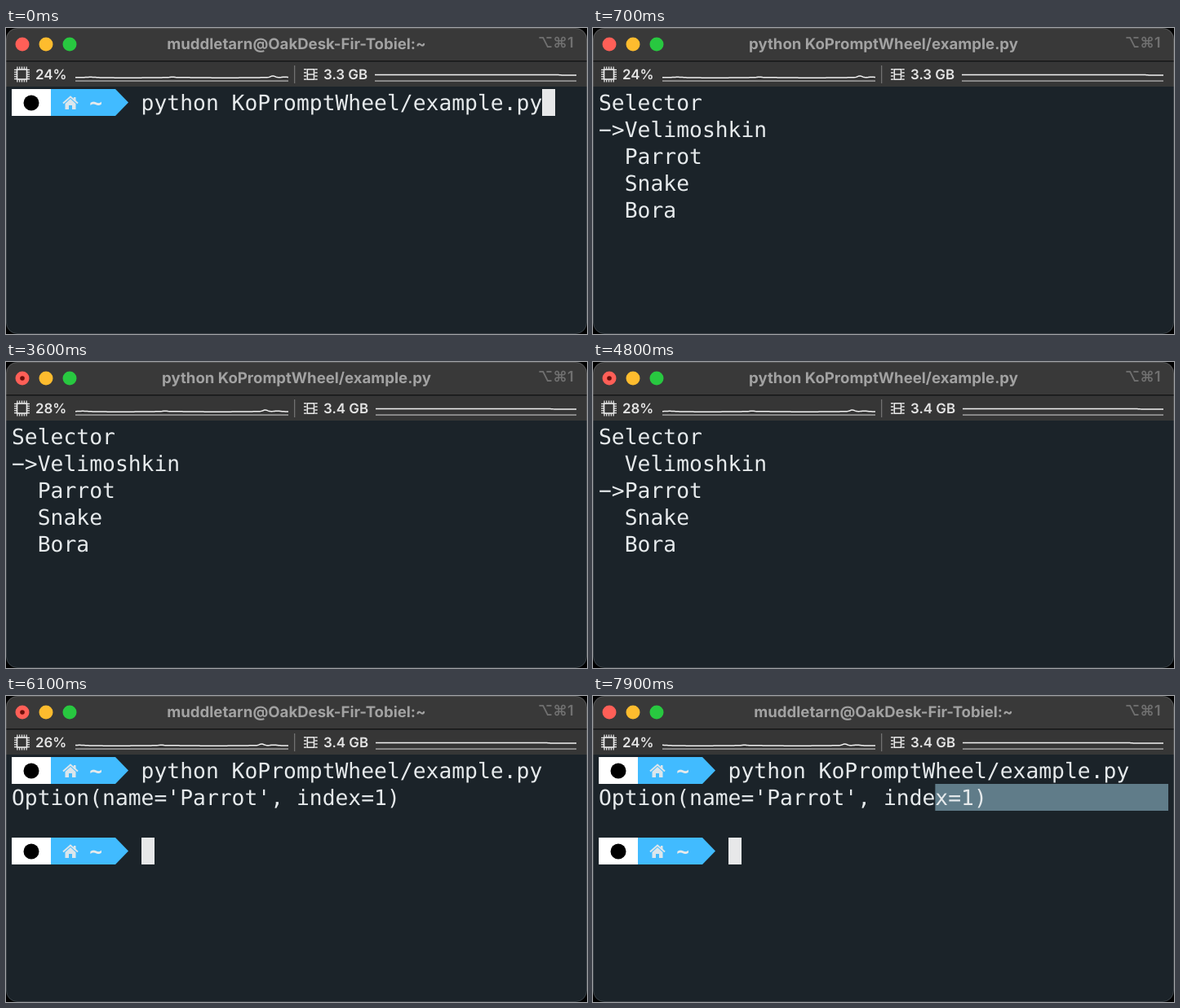
Recreate the animation shown at these times as an HTML page with a canvas. Size 712 by 376 pixels, loop 8 s.

```html
<!DOCTYPE html>
<html lang="en">
<head>
<meta charset="utf-8">
<title>Terminal menu</title>
<style>
  html, body { margin: 0; width: 100%; height: 100%; overflow: hidden; background: #000; }
  canvas { display: block; width: 712px; height: 376px; }
</style>
</head>
<body>
<canvas id="stage" width="712" height="376"></canvas>
<script>
const ctx = document.getElementById('stage').getContext('2d');
const W = 712, H = 376, LOOP = 8000;
const LEFT = 7, TOP = 75, COL = 15.86, ROW = 33;
const UI = 'Inter, "Open Sans", sans-serif';
const MONO = '"DejaVu Sans Mono", monospace';
const INK = '#e6eaec';

const COMMAND = 'python KoPromptWheel/example.py';
const SHELL = 'muddletarn@OakDesk-Fir-Tobiel:~';
const OPTIONS = ['Velimoshkin', 'Parrot', 'Snake', 'Bora'];

// Times in ms
const ENTER = 200, MENU = 400, CHOSEN = 5000, PROMPT = 5200;
const MOVES = [1300, 1900, 2500, 3200, 3900];
const UPDATES = [1100, 3000, 5100, 6800];
const CPU = ['24%', '24%', '28%', '26%', '24%'];
const SELECT_FROM = 7300, SELECT_TO = 7900;

const passed = (times, t) => times.filter(x => t >= x).length;
const bump = (x, at, w) => Math.exp(-(((x - at) / w) ** 2));
const colX = c => LEFT + c * COL;
const rowY = r => TOP + r * ROW;

function rect(x, y, w, h, color) {
  ctx.fillStyle = color;
  ctx.fillRect(x, y, w, h);
}

function disc(x, y, r, color) {
  ctx.fillStyle = color;
  ctx.beginPath();
  ctx.arc(x, y, r, 0, Math.PI * 2);
  ctx.fill();
}

function poly(points, color) {
  ctx.fillStyle = color;
  ctx.beginPath();
  points.forEach(([x, y]) => ctx.lineTo(x, y));
  ctx.fill();
}

function label(text, x, y, size, weight, color, align = 'left') {
  ctx.font = `${weight} ${size}px ${UI}`;
  ctx.textAlign = align;
  ctx.fillStyle = color;
  ctx.fillText(text, x, y);
}

// Terminal text sits on a fixed character grid
function type(text, row, col = 0, weight = 400) {
  ctx.font = `${weight} 26.3px ${MONO}`;
  ctx.textAlign = 'left';
  ctx.fillStyle = INK;
  [...text].forEach((ch, i) => ctx.fillText(ch, colX(col + i), rowY(row) + 26));
}

function cursor(row, col) {
  rect(Math.round(colX(col)), rowY(row), 16, ROW, '#e7e8e9');
}

function prompt(row) {
  const y = rowY(row);
  poly([[55, y], [134, y], [150, y + 16.5], [134, y + ROW], [55, y + ROW]], '#41bbff');
  rect(7, y, 48, ROW, '#fff');
  disc(31, y + 17, 9.5, '#000');
  house(79, y + 17);
  type('~', row, 6, 700);
}

function house(x, y) {
  const c = '#dbe6ec';
  poly([[x - 6.5, y + 1], [x, y - 5], [x + 6.5, y + 1], [x + 6.5, y + 8],
    [x + 2, y + 8], [x + 2, y + 3], [x - 2, y + 3], [x - 2, y + 8], [x - 6.5, y + 8]], c);
  rect(x + 4, y - 7, 2.5, 5, c);
  ctx.strokeStyle = c;
  ctx.lineWidth = 2;
  ctx.beginPath();
  ctx.moveTo(x - 9, y + 0.5);
  ctx.lineTo(x, y - 7.5);
  ctx.lineTo(x + 9, y + 0.5);
  ctx.stroke();
}

function titleBar(t, tick) {
  rect(0, 0, W, 41, '#393939');
  rect(0, 40, W, 1.5, '#151515');
  ['#ff5f57', '#febc2e', '#28c840'].forEach((c, i) => disc(20 + 29 * i, 20, 8.5, c));
  if (tick > 0 && tick < 4) disc(20, 20, 2.8, '#6b0f0a');
  const running = t >= ENTER && t < CHOSEN;
  label(running ? COMMAND : SHELL, 356, 26, 18.6, 700, '#a2a2a2', 'center');
  label('⌥⌘1', 695.5, 24, 18, 600, '#707070', 'right');
}

function chipIcon() {
  const c = '#eee';
  ctx.strokeStyle = c;
  ctx.lineWidth = 1.6;
  ctx.strokeRect(13.5, 51, 12, 12);
  for (let i = 0; i < 5; i++) {
    const d = i * 2.8;
    rect(13.3 + d, 47.5, 1.2, 3, c);
    rect(13.3 + d, 63.5, 1.2, 3, c);
    rect(10, 50.8 + d, 3, 1.2, c);
    rect(26, 50.8 + d, 3, 1.2, c);
  }
}

function memoryIcon() {
  const c = '#eee';
  ctx.strokeStyle = c;
  ctx.lineWidth = 1.5;
  ctx.strokeRect(369.3, 50.8, 8.2, 12.4);
  rect(369, 56.3, 9, 1.4, c);
  for (let y = 50.1; y < 64; y += 4.1) {
    rect(365, y, 3.3, 1.4, c);
    rect(378.4, y, 3.3, 1.4, c);
  }
}

function graph(x0, x1, height) {
  rect(x0, 64.4, x1 - x0, 1.3, '#b4b4b4');
  ctx.strokeStyle = '#f2f2f2';
  ctx.lineWidth = 1.5;
  ctx.beginPath();
  for (let x = x0; x <= x1; x++) ctx.lineTo(x, height(x));
  ctx.stroke();
}

function statusBar(tick) {
  const shift = tick * 4.6;
  rect(0, 41.5, W, 30.5, '#363636');
  chipIcon();
  label(CPU[tick], 36, 63, 16.9, 600, '#e4e4e4');
  graph(85, 346, x => {
    const u = x + shift;
    return 61 - 1.8 * bump(u, 327, 4) - 0.7 * bump(u, 342, 5) - 0.6 * bump(u, 204, 4)
      - 0.5 * bump(u, 104, 8) + 0.2 * Math.sin(u / 19);
  });
  rect(353, 46, 1.3, 22, '#707070');
  memoryIcon();
  label(tick ? '3.4 GB' : '3.3 GB', 389, 63, 16.9, 600, '#e4e4e4');
  graph(tick ? 453 : 452, 699, x => 57.6 + 0.5 / (1 + Math.exp(680 - x - shift)));
}

function menu(t) {
  const chosen = passed(MOVES, t) % OPTIONS.length;
  type('Selector', 0);
  OPTIONS.forEach((name, i) => {
    if (i === chosen) type('−>', i + 1);
    type(name, i + 1, 2);
  });
}

function selection(t) {
  const k = Math.min(1, (t - SELECT_FROM) / (SELECT_TO - SELECT_FROM));
  const col = 44 - Math.round(18 * k);
  rect(colX(col), rowY(1), 705 - colX(col), ROW, '#607c89');
}

function terminal(t) {
  if (t >= MENU && t < CHOSEN) return menu(t);
  prompt(0);
  type(COMMAND, 0, 10);
  if (t < ENTER) return cursor(0, 41);
  if (t < MENU) return cursor(1, 0);
  if (t > SELECT_FROM) selection(t);
  type("Option(name='Parrot', index=1)", 1);
  if (t < PROMPT) return cursor(2, 0);
  prompt(3);
  cursor(3, 10);
}

function outline(inset, radius) {
  ctx.beginPath();
  ctx.roundRect(inset, inset, W - 2 * inset, H - 2 * inset, radius);
}

function draw(t) {
  const tick = passed(UPDATES, t);
  rect(0, 0, W, H, '#000');
  ctx.save();
  outline(0, 14);
  ctx.clip();
  rect(0, 0, W, H, '#1b2329');
  titleBar(t, tick);
  statusBar(tick);
  terminal(t);
  outline(0.5, 13.5);
  ctx.strokeStyle = 'rgba(255, 255, 255, 0.13)';
  ctx.lineWidth = 1;
  ctx.stroke();
  ctx.restore();
}

ctx.textRendering = 'geometricPrecision';
const start = performance.now();

function frame() {
  const t = (performance.now() - start) % LOOP;
  draw(Math.floor(t / 100) * 100);
  requestAnimationFrame(frame);
}
frame();
</script>
</body>
</html>
```
